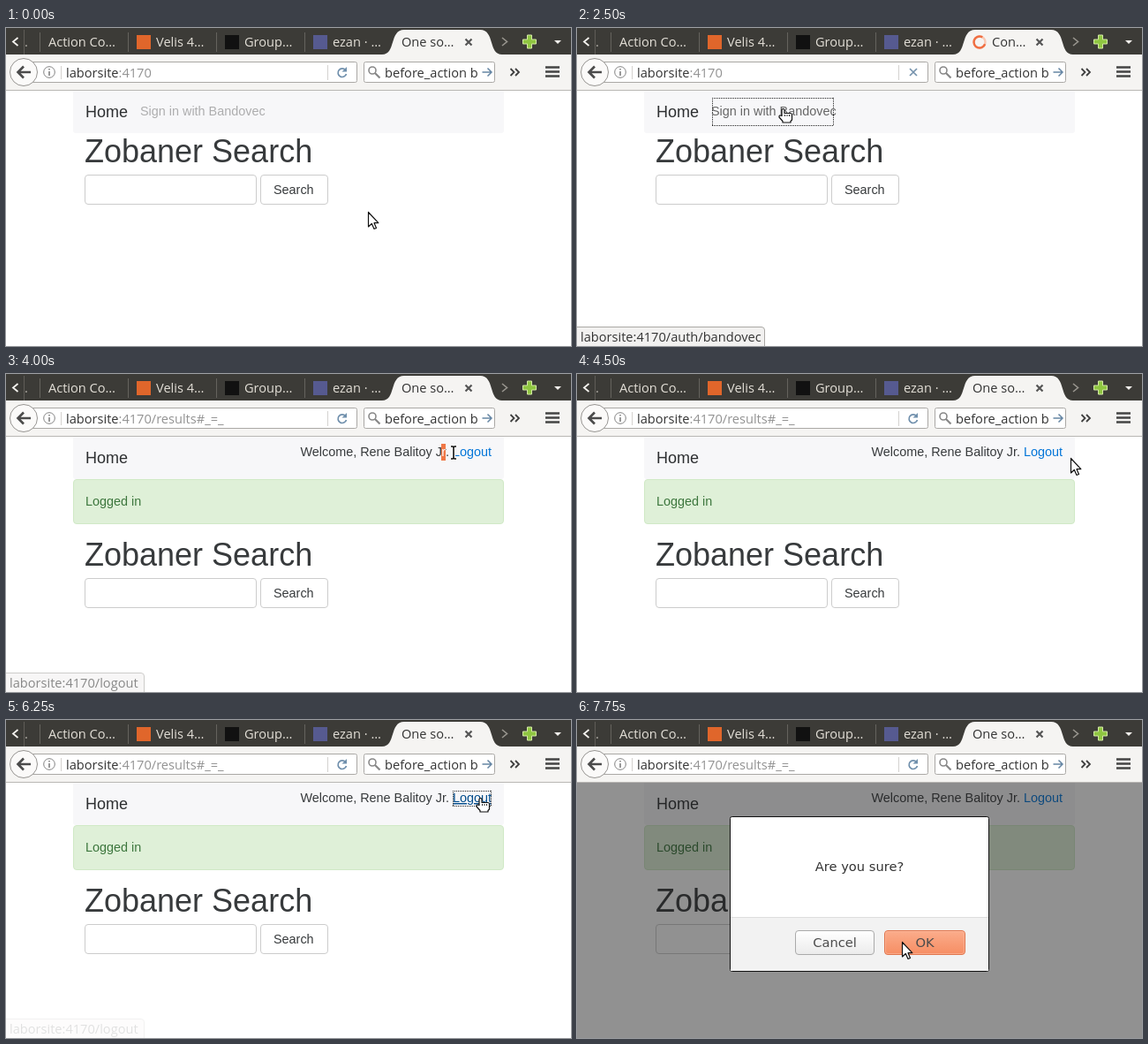
Recreate the animation shown at these times as an HTML page. Size 640 px wide and 360 px high, loop 8 s.

```html
<!DOCTYPE html>
<html lang="en">
<head>
<meta charset="utf-8">
<title>Sign in and out</title>
<style>
html, body { margin: 0; width: 100%; height: 100%; overflow: hidden; background: #fff; }
svg { display: block; width: 640px; height: 360px; }
text { white-space: pre; }
.ui { font: 14.6px "Open Sans", "Noto Sans", sans-serif; }
.page { font: 14.4px "Liberation Sans", Arial, sans-serif; }
.dialog { font: 14.67px "DejaVu Sans", sans-serif; }
</style>
</head>
<body>
<svg id="stage" viewBox="0 0 640 360"></svg>
<script>
const STEP = 250, LOOP = 8000;
const HOST = "laborsite", PORT = ":4170";
const stage = document.getElementById("stage");

const rect = (x, y, w, h, fill, more = "") =>
  `<rect x="${x}" y="${y}" width="${w}" height="${h}" fill="${fill}" ${more}/>`;
const text = (x, y, str, fill, more = "") =>
  `<text x="${x}" y="${y}" fill="${fill}" ${more}>${str}</text>`;
const line = (d, stroke, width = 1, more = "") =>
  `<path d="${d}" fill="none" stroke="${stroke}" stroke-width="${width}" ${more}/>`;
const shape = (d, fill, more = "") => `<path d="${d}" fill="${fill}" ${more}/>`;

// Dots sit on whole pixels: every second one along each side.
const focusRing = (x, y, w, h) => {
  const dots = 'stroke-dasharray="1 1"';
  return line(`M${x} ${y + .5}H${x + w}`, "#222", 1, dots) +
    line(`M${x} ${y + h - .5}H${x + w}`, "#222", 1, dots) +
    line(`M${x + .5} ${y}V${y + h}`, "#222", 1, dots) +
    line(`M${x + w - .5} ${y}V${y + h}`, "#222", 1, dots);
};

// Pointer waypoints: step, x, y. It rests wherever two of them agree.
const route = [
  [0, 410, 208], [3, 233, 91], [12, 233, 91], [16, 507, 89], [17, 547, 90],
  [18, 559, 95], [20, 165, 145], [21, 46, 139], [22, 90, 152], [25, 537, 88],
  [26, 537, 89], [27, 530, 89], [31, 368, 251]
];

function pointerAt(step) {
  const next = Math.max(1, route.findIndex(p => p[0] >= step));
  const [s0, x0, y0] = route[next - 1], [s1, x1, y1] = route[next];
  const k = (step - s0) / (s1 - s0);
  return [x0 + (x1 - x0) * k, y0 + (y1 - y0) * k].map(Math.round);
}

function pointer(step) {
  const [x, y] = pointerAt(step);
  const overLink = (step >= 3 && step <= 10) || step === 25;
  const overText = (step >= 14 && step <= 16) || step === 20;
  const edge = 'stroke="#111" stroke-width="1.2" stroke-linejoin="round"';
  let art;
  if (overLink) {
    art = shape("M-1 1.500Q.5-.5 2 1.500V5.500H9Q10.500 5.500 10.500 7.500V13L9 14.500V16H0V14.500L-4 10Q-4.500 7-1 8.500Z", "#fff", edge) +
      line("M2.500 7V9M5 7V9M7.500 7V9", "#111", .9);
  } else if (overText) {
    const beam = "M-3-7H-1L0-6L1-7H3M0-6V6M-3 7H-1L0 6L1 7H3";
    art = line(beam, "#fff", 4) + line(beam, "#111", 1.6);
  } else {
    art = shape("M.5.500V17L4.300 13.500L7 19.500L9.500 18.500L7 12.700H11.800Z", "#fff", edge);
  }
  return `<g transform="translate(${x} ${y})">${art}</g>`;
}

function tabs(loading, step) {
  const names = ["Action Co…", "Velis 4…", "Group…", "ezan · …"];
  const icons = [null, "#e0662b", "#111", "#565a90"];
  let out = rect(0, 0, 640, 30, "#3c3b37") +
    line("M13.500 11L8 15.500L13.500 20", "#f4f2ee", 1.8) +
    line("M20.500 2V30", "#5f5d58") + text(21, 21, ".", "#b9b5ad");
  names.forEach((name, i) => {
    const x = 38 + i * 100;
    out += line(`M${x + .5} 5V27`, "#65635e");
    if (icons[i]) out += rect(x + 10, 8, 16, 16, icons[i]);
    out += text(x + (icons[i] ? 32 : 10), 21, name, "#e4e0d8");
  });
  out += shape("M426 30C442 30 434 2 451 2H527C544 2 546 30 562 30Z".replace("527C544 2 546 30 562", "537C554 2 546 30 562"), "#f5f4f2");
  if (loading) {
    out += `<circle cx="456" cy="16" r="6.500" fill="none" stroke="#f9c7b2" stroke-width="2.400"/>` +
      `<circle cx="456" cy="16" r="6.500" fill="none" stroke="#ef6f43" stroke-width="2.400" stroke-dasharray="31 10" transform="rotate(${20 + (step - 10) * 90} 456 16)"/>` +
      text(470, 21, "Con…", "#333");
  } else {
    out += text(448, 21, "One so…", "#333");
  }
  return out + line("M520.500 12.500L527.500 19.500M527.500 12.500L520.500 19.500", "#555", 2.200) +
    line("M562 11L567.500 15.500L562 20", "#99968f", 1.6) +
    shape("M590.500 8H595.500V13H600.500V18H595.500V23H590.500V18H585.500V13H590.500Z", "#8fc641", 'stroke="#d4e8a5"') +
    shape("M621 14H629L625 18Z", "#f2f0ec");
}

function toolbar(loading, path) {
  const field = 'stroke="#aaa8a5" rx="2"';
  const action = loading
    ? line("M377 46L385 54M385 46L377 54", "#7592ac", 1.7)
    : line("M384.500 47.500A4.800 4.800 0 1 0 385.500 52", "#6f8fac", 1.7) + shape("M386 44V49.500H380.500Z", "#6f8fac");
  return rect(0, 30, 640, 40, "#f5f4f2") + rect(0, 70, 640, 1, "#b9b7b4") +
    rect(20.5, 38.5, 377, 23, "#fff", field) +
    `<circle cx="20" cy="50" r="15.500" fill="#fbfaf9" stroke="#979592"/>` +
    line("M28 50H14M20 43.500L13.500 50L20 56.500", "#4b4b4b", 2.600) +
    `<circle cx="49" cy="50" r="6.300" fill="none" stroke="#828282"/>` +
    line("M49 49V54M49 46V47.500", "#777", 1.5) +
    line("M62.500 43V58M364.500 42V59", "#d4d2cf") +
    text(68, 56, `${HOST}<tspan fill="#929292">${PORT}${path}</tspan>`, "#333") + action +
    rect(405.5, 38.5, 148, 23, "#fff", field) +
    `<circle cx="415" cy="48" r="4" fill="none" stroke="#888" stroke-width="1.600"/>` +
    line("M418 51L423.500 56.500", "#888", 2.200) +
    text(429, 56, "before_action b", "#333") +
    rect(536, 40, 17, 20, "#fff") +
    line("M539.500 50H549.500M545.500 45.500L550 50L545.500 54.500", "#6686a4", 1.5) +
    line("M571.500 46L575.500 50L571.500 54M577 46L581 50L577 54", "#3f3f3f", 1.8) +
    line("M611 44.500H627M611 49.500H627M611 54.500H627", "#444", 2.400);
}

function searchForm(dy) {
  const box = 'stroke="#ccc" rx="3.500"';
  return `<g transform="translate(0 ${dy})">` +
    text(89, 152, "Zobaner Search", "#373a3c", 'font-size="36"') +
    rect(89.5, 166.5, 194, 33, "#fff", box) + rect(288.5, 166.5, 76, 33, "#fff", box) +
    text(303, 188, "Search", "#373a3c") + "</g>";
}

function page(step, loggedIn) {
  let out = rect(0, 71, 640, 289, "#fff") +
    shape("M76 71H564V116Q564 119 561 119H79Q76 119 76 116Z", "#f7f7f9") +
    text(90, 101, "Home", "#2d2f31", 'font-size="18"');
  if (!loggedIn) {
    out += text(152, 99, "Sign in with Bandovec", step >= 3 ? "#666" : "#adadae");
    if (step >= 5) out += focusRing(153, 79, 138, 32);
    return out + searchForm(0);
  }
  const hover = step >= 25 && step <= 27;
  const end = 'text-anchor="end"';
  out += text(502, 93, "Welcome, Rene Balitoy Jr.", "#373a3c", end) +
    text(506, 93, "Logout", hover ? "#014c8c" : "#0275d8",
      step === 25 ? 'text-decoration="underline"' : "");
  if (step === 16 || step === 17) {
    out += rect(493, 79, 5, 19, "#f07746") + text(498, 93, "r", "#fff", end);
  }
  if (step === 25) out += focusRing(506, 80, 44, 18);
  out += rect(76.5, 119.5, 487, 50, "#dff0d8", 'stroke="#d0e9c6" rx="3.500"');
  const selected = step === 21;
  if (selected) out += rect(90, 135, 67, 19, "#f07746");
  return out + text(90, 149, "Logged in", selected ? "#fff" : "#3c763d") + searchForm(65);
}

function dialog() {
  const middle = 'text-anchor="middle"';
  return rect(0, 71, 640, 289, "#1a1a1a", 'opacity=".48"') +
    `<defs>
      <linearGradient id="plain" x2="0" y2="1"><stop stop-color="#fff"/><stop offset="1" stop-color="#ebebeb"/></linearGradient>
      <linearGradient id="warm" x2="0" y2="1"><stop stop-color="#fbad8c"/><stop offset="1" stop-color="#f68d63"/></linearGradient>
    </defs>` +
    rect(173.5, 109.5, 293, 175, "#fff", 'stroke="#111" rx="2"') +
    rect(174, 223, 292, 61, "#f2f2f2") + rect(174, 223, 292, 1, "#dedede") +
    text(320, 171, "Are you sure?", "#333", middle) +
    rect(247.5, 238.5, 89, 27, "url(#plain)", 'stroke="#aaa" rx="3.500"') +
    text(292, 257, "Cancel", "#4c4c4c", middle) +
    rect(348.5, 238.5, 91, 27, "url(#warm)", 'stroke="#e0764e" rx="3.500"') +
    rect(349.5, 239.5, 89, 25, "none", 'stroke="#fcbda3" stroke-opacity=".6" rx="2.500"') +
    text(394, 257, "OK", "#4c4c4c", middle);
}

function statusBar(step) {
  const signIn = step >= 3 && step <= 10;
  const opacity = signIn || step === 26 || step === 27 ? 1
    : step === 16 ? .58 : step === 25 ? .14 : 0;
  if (!opacity) return "";
  const width = signIn ? 212 : 156;
  return `<g opacity="${opacity}">` +
    shape(`M-1 338.500H${width - 3}Q${width + .5} 338.500 ${width + .5} 342V361H-1Z`, "#f2f1f0", 'stroke="#aaa8a5"') +
    text(4, 355, HOST + PORT + (signIn ? "/auth/bandovec" : "/logout"), "#333") + "</g>";
}

function draw(step) {
  const loading = step >= 5 && step <= 10;
  const loggedIn = step >= 11;
  stage.innerHTML =
    `<g class="page">${page(step, loggedIn)}</g>` +
    `<g class="dialog">${step >= 26 ? dialog() : ""}</g>` +
    `<g class="ui">${tabs(loading, step)}${toolbar(loading, loggedIn ? "/results#_=_" : "")}${statusBar(step)}</g>` +
    pointer(step);
}

let shown = -1;
const start = performance.now();
function tick() {
  const step = Math.floor(((performance.now() - start) % LOOP) / STEP);
  if (step !== shown) draw(shown = step);
  requestAnimationFrame(tick);
}
tick();
</script>
</body>
</html>
```
